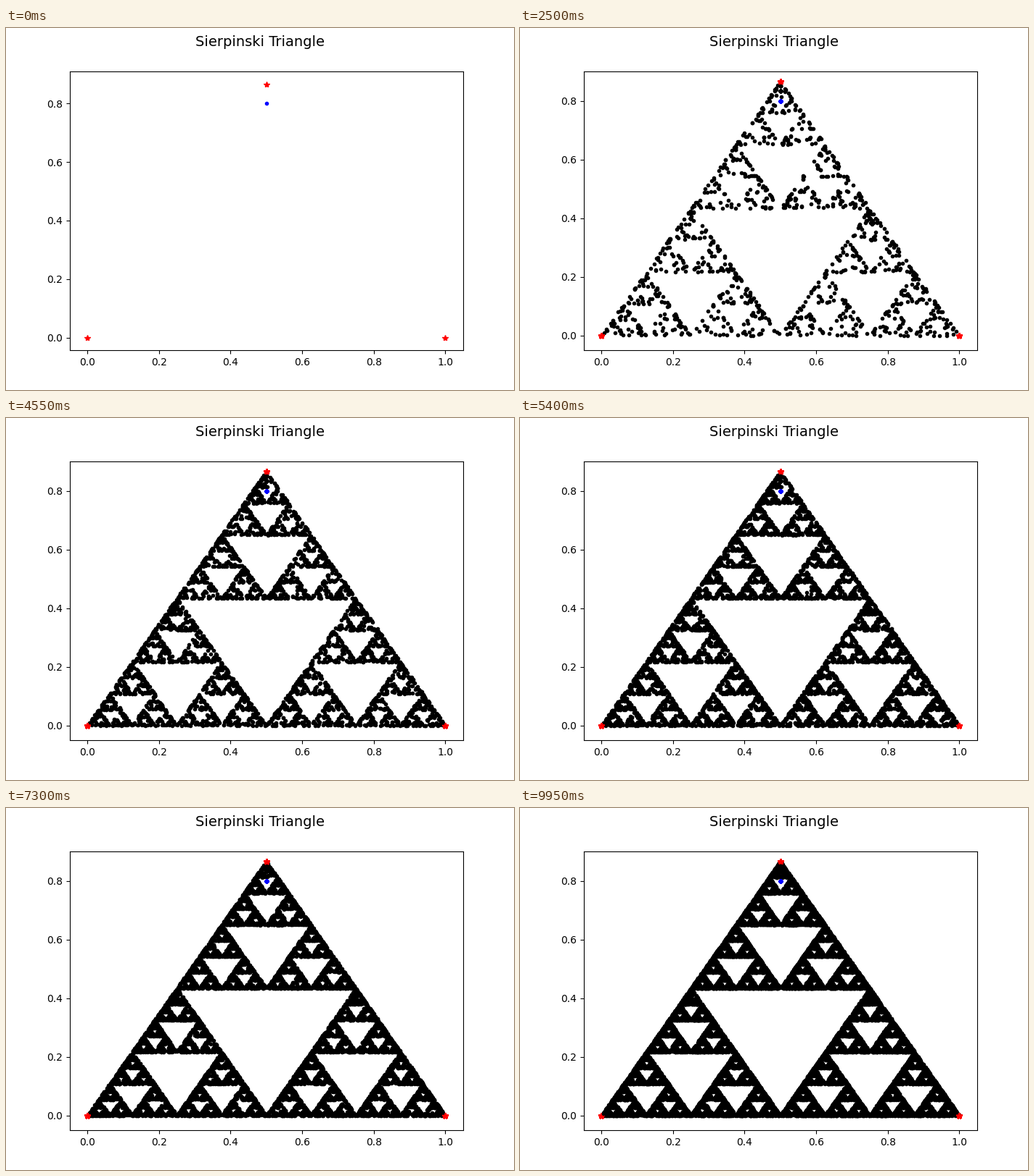
A matplotlib script that plays this animation: 700x500 px, repeating every 10000 ms.

```python
import numpy as np
import matplotlib.pyplot as plt
from matplotlib.animation import FuncAnimation

FRAMES = 200
INTERVAL = 50
RECENT = 8  # latest passes that are stacked one by one
CORNERS = np.array([[0, 0], [1, 0], [0.5, np.sqrt(3) / 2]])
START = np.array([[0.5, 0.8]])

rng = np.random.default_rng(42)


def chaos_game(steps):
    """Jump halfway to a random corner, again and again."""
    point = START[0]
    path = np.empty((steps, 2))
    for n, corner in enumerate(rng.integers(3, size=steps)):
        point = (point + CORNERS[corner]) / 2
        path[n] = point
    return path


# Pass n restarts the game and adds n more dots.
dots = np.concatenate([chaos_game(n) for n in range(FRAMES)])


def first_dot(n):
    return n * (n - 1) // 2


fig, ax = plt.subplots(figsize=(7, 5), dpi=100)
fig.suptitle("Sierpinski Triangle", fontsize=14)
ax.set_xlim(-0.05, 1.05)


def layer(fmt):
    return ax.plot([], [], fmt)[0]


def show(line, points):
    line.set_data(points[:, 0], points[:, 1])


old_dots = layer("k.")
old_marks = layer("r*"), layer("b.")
recent = [(layer("r*"), layer("b."), layer("k.")) for _ in range(RECENT)]


def show_marks(lines, count):
    """Repeated marks build up their soft edges."""
    stars, start = lines
    show(stars, np.tile(CORNERS, (count, 1)))
    show(start, np.tile(START, (count, 1)))


def update(i):
    if i == 0:
        margin = 0.05 * CORNERS[2, 1]
        ax.set_ylim(-margin, CORNERS[2, 1] + margin)
    else:
        ax.set_ylim(-0.05, 0.9)

    old = max(i + 1 - RECENT, 0)
    show(old_dots, dots[:first_dot(old)])
    show_marks(old_marks, old)
    for n, (stars, start, black) in enumerate(recent, old):
        shown = n <= i
        show_marks((stars, start), int(shown))
        show(black, dots[first_dot(n):first_dot(n + 1)] if shown else dots[:0])


ani = FuncAnimation(fig, update, frames=FRAMES, interval=INTERVAL,
                    init_func=lambda: update(0), repeat=True, repeat_delay=0)
plt.show()
```
